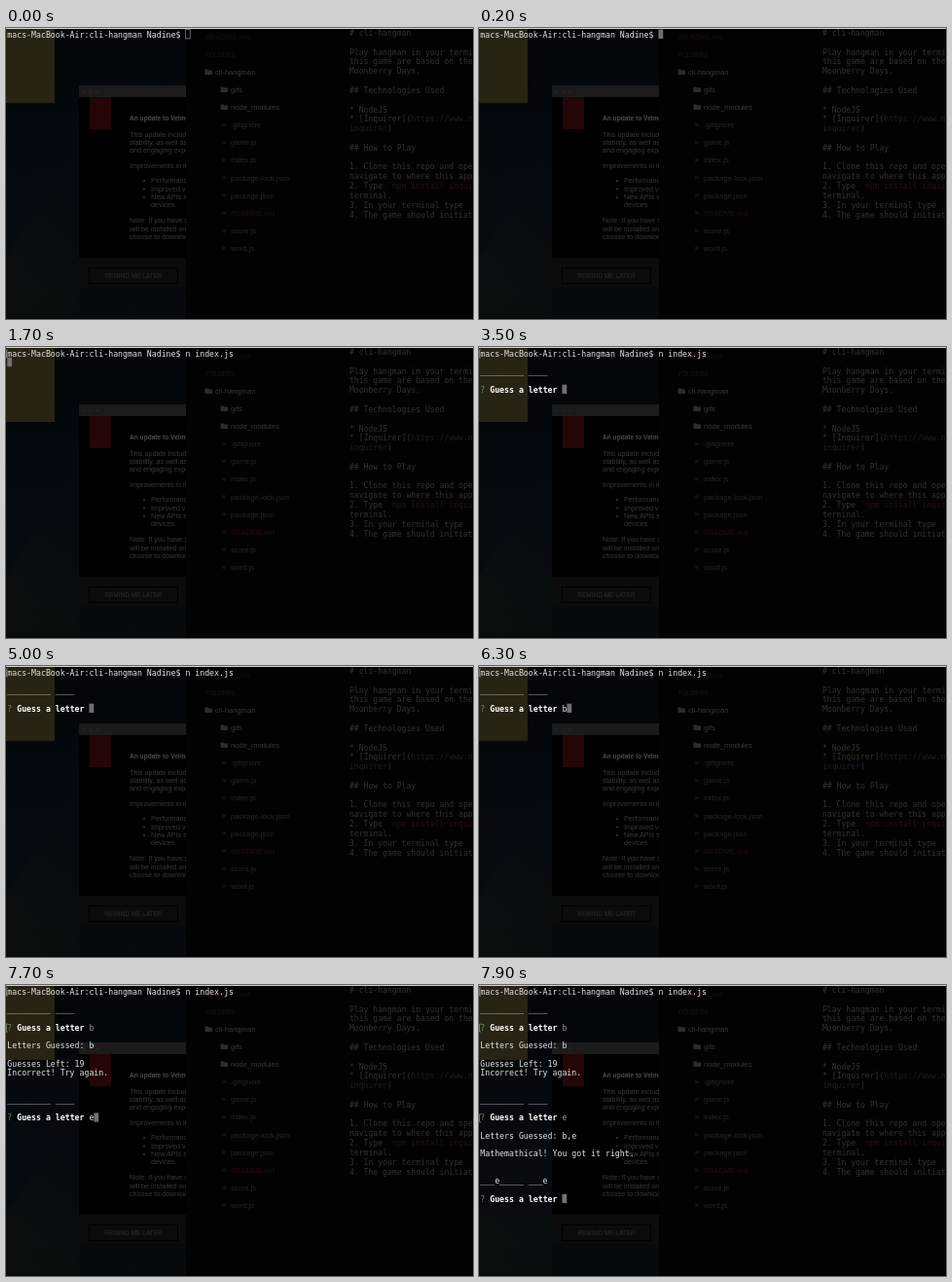
Recreate the animation shown at these times as an HTML page. Size 480 px wide and 299 px high, loop 8000 ms.

```html
<!DOCTYPE html>
<html lang="en">
<head>
<meta charset="utf-8">
<title>Hangman in the terminal</title>
<style>
  html, body { margin: 0; width: 100%; height: 100%; overflow: hidden; background: #000; }
  svg { display: block; width: 100vw; height: 100vh; }
  text { white-space: pre; }
  .mono { font-family: "DejaVu Sans Mono", monospace; }
  .sans { font-family: "Liberation Sans", Arial, sans-serif; }
  #term { font-size: 8.22px; fill: #e4e4e4; }
  .ask { fill: #5f9a3c; }
  .bold { font-weight: bold; fill: #fff; }
  .answer { fill: #87a0a0; }
</style>
</head>
<body>
<svg viewBox="0 0 480 299" preserveAspectRatio="none">
  <defs>
    <linearGradient id="sky" x2="0" y2="1">
      <stop offset="0" stop-color="#030507"/>
      <stop offset=".5" stop-color="#060a0f"/>
      <stop offset="1" stop-color="#07090b"/>
    </linearGradient>
    <linearGradient id="haze" x1=".2" y1="1" x2=".8" y2="0">
      <stop offset="0" stop-color="#0b0d0d"/>
      <stop offset="1" stop-color="#0b0d0d" stop-opacity="0"/>
    </linearGradient>
    <clipPath id="left"><rect width="185" height="299"/></clipPath>
  </defs>
  <rect width="185" height="299" fill="url(#sky)"/>
  <path d="M0 299V235L75 120V299z" fill="url(#haze)"/>
  <g id="stars" fill="#151c26"></g>
  <rect width="50" height="77" fill="#272413"/>
  <g clip-path="url(#left)">
    <rect x="75" y="59" width="110" height="207"/>
    <rect x="75" y="59" width="110" height="12" fill="#1b1b1b"/>
    <rect x="75" y="236" width="110" height="30" fill="#0b0b0b"/>
    <g fill="#222"><circle cx="80" cy="65.5" r="1.8"/><circle cx="87" cy="65.5" r="1.8"/><circle cx="94" cy="65.5" r="1.8"/></g>
    <rect x="86" y="71" width="22" height="33" fill="#240606"/>
    <rect x="85.5" y="246.5" width="91" height="16" fill="none" stroke="#000"/>
    <g id="dialog" class="sans"></g>
  </g>
  <rect x="185" width="295" height="299" fill="#020202"/>
  <g id="files" class="sans"></g>
  <g id="readme" class="mono"></g>
  <rect width="480" height="1" fill="#d0d0d0"/>
  <g id="term" class="mono"></g>
</svg>
<script>
const $ = id => document.getElementById(id);
const text = (x, y, s, size, fill, more = "") =>
  `<text x="${x}" y="${y}" font-size="${size}" fill="${fill}" ${more}>${s}</text>`;

// Wallpaper stars
let seed = 7;
const rnd = () => (seed = seed * 16807 % 2147483647) / 2147483647;
$("stars").innerHTML = Array.from({ length: 40 }, () =>
  `<circle cx="${rnd() * 185}" cy="${rnd() * 290}" r="${.2 + rnd() * .4}"/>`).join("");

// Update dialog
const body = [
  [127, 109.5, "This update includes"], [127, 117.7, "stability, as well as"],
  [127, 126, "and engaging experi"], [127, 142, "Improvements in it"],
  [149, 157, "Performance"], [149, 165.5, "Improved video"],
  [149, 174, "New APIs so"], [149, 182, "devices"],
  [127, 198, "Note: If you have se"], [127, 206.3, "will be installed on"],
  [127, 214.5, "choose to download"]
];
$("dialog").innerHTML =
  text(127, 95.2, "An update to Velmora", 6.6, "#4c4c4c", 'font-weight="bold"') +
  body.map(([x, y, s]) => text(x, y + 2.4, s, 7.2, "#383838")).join("") +
  [157, 165.5, 174].map(y => `<circle cx="142" cy="${y}" r="1" fill="#383838"/>`).join("") +
  text(131, 257, "REMIND ME LATER", 6.5, "#2c2c2c", 'text-anchor="middle"');

// Editor sidebar
const folder = (x, y) => `<path d="M${x} ${y - 2.5}h3l1 1h3.5v4.5h-7.5z" fill="#2c2c2c"/>`;
const names = [".gitignore", "game.js", "index.js", "package-lock.json",
  "package.json", "README.md", "score.js", "word.js"];
$("files").innerHTML =
  text(205, 12, "README.md", 7.7, "#1e0c0e") +
  text(205, 29.5, "FOLDERS", 6.5, "#161616") +
  folder(204.5, 45) + text(215, 47.7, "cli-hangman", 7.6, "#383838") +
  folder(220.5, 63) + text(231, 65.7, "gifs", 7.6, "#383838") +
  folder(220.5, 81) + text(231, 83.7, "node_modules", 7.6, "#383838") +
  names.map((s, i) => {
    const y = 99.5 + i * 18.1;
    return `<rect x="222" y="${y - 1.5}" width="4" height="3" fill="#111"/>` +
      text(231, y + 2.7, s, 7.6, s == "README.md" ? "#260e10" : "#262626");
  }).join("");

// Editor text
const tint = (fill, s) => `<tspan fill="${fill}">${s}</tspan>`;
const doc = ["# cli-hangman", "", "Play hangman in your terminal", "this game are based on the",
  "Moonberry Days.", "", "## Technologies Used", "", "* NodeJS",
  "* [" + tint("#34332a", "Inquirer") + "](" + tint("#1f1c26", "https://www.npmjs"),
  tint("#1f1c26", "inquirer") + ")", "", "## How to Play", "",
  "1. Clone this repo and open", "navigate to where this app",
  "2. Type " + tint("#281012", "`npm install inquirer`"), "terminal.",
  "3. In your terminal type", "4. The game should initiate"];
$("readme").innerHTML = doc.map((s, i) =>
  text(353, 8 + i * 9.82, s, 8.1, "#323232")).join("");

// Terminal
const LEFT = 1.3, COL = 4.95, ROW = 9.27;
const line = (row, s) => `<text x="${LEFT}" y="${9.5 + row * ROW}">${s}</text>`;
const mark = row => `<path d="M2 ${3 + row * ROW}H.5v8H2" fill="none" stroke="#888" stroke-width=".8"/>`;
const cursor = (col, row, hollow) => {
  const paint = hollow ? 'fill="none" stroke="#777" stroke-width=".8"' : 'fill="#707070"';
  return `<rect x="${LEFT + col * COL}" y="${1.6 + row * ROW}" width="4.8" height="9.3" ${paint}/>`;
};
const question = '<tspan class="ask">?</tspan> <tspan class="bold">Guess a letter</tspan> ';
const typing = [[0, ""], [800, "n"], [900, "n "], [1100, "n i"], [1200, "n in"], [1300, "n index.js "]];

// One round: word, question, then the letter typed or answered
function round(t, row, word, start, typed, enter, letter) {
  if (t < start) return "";
  const out = line(row, word);
  if (t >= enter) return out + line(row + 2, question + `<tspan class="answer">${letter}</tspan>`) + mark(row + 2);
  const s = t >= typed ? letter : "";
  return out + line(row + 2, question + s) + cursor(17 + s.length, row + 2);
}

function screen(t) {
  const cmd = typing.filter(([at]) => t >= at).pop()[1];
  let out = line(0, "macs-MacBook-Air:cli-hangman Nadine$ " + cmd);
  if (t < 1400) return out + cursor(37 + cmd.length, 0, t < 200);
  out += mark(0);
  if (t < 3500) return out + cursor(0, 1);
  out += round(t, 2, "_________ ____", 3500, 6100, 6400, "b");
  if (t >= 6400)
    out += line(6, "Letters Guessed: b") + line(8, "Guesses Left: 19") + line(9, "Incorrect! Try again.");
  out += round(t, 12, "_________ ____", 6400, 7700, 7900, "e");
  if (t >= 7900)
    out += line(16, "Letters Guessed: b,e") + line(18, "Mathemathical! You got it right.");
  return out + round(t, 21, "___e_____ ___e", 7900, 8000, 8000, "");
}

let shown;
function draw() {
  const next = screen(performance.now() % 8000);
  if (next != shown) $("term").innerHTML = shown = next;
  requestAnimationFrame(draw);
}
draw();
</script>
</body>
</html>
```
